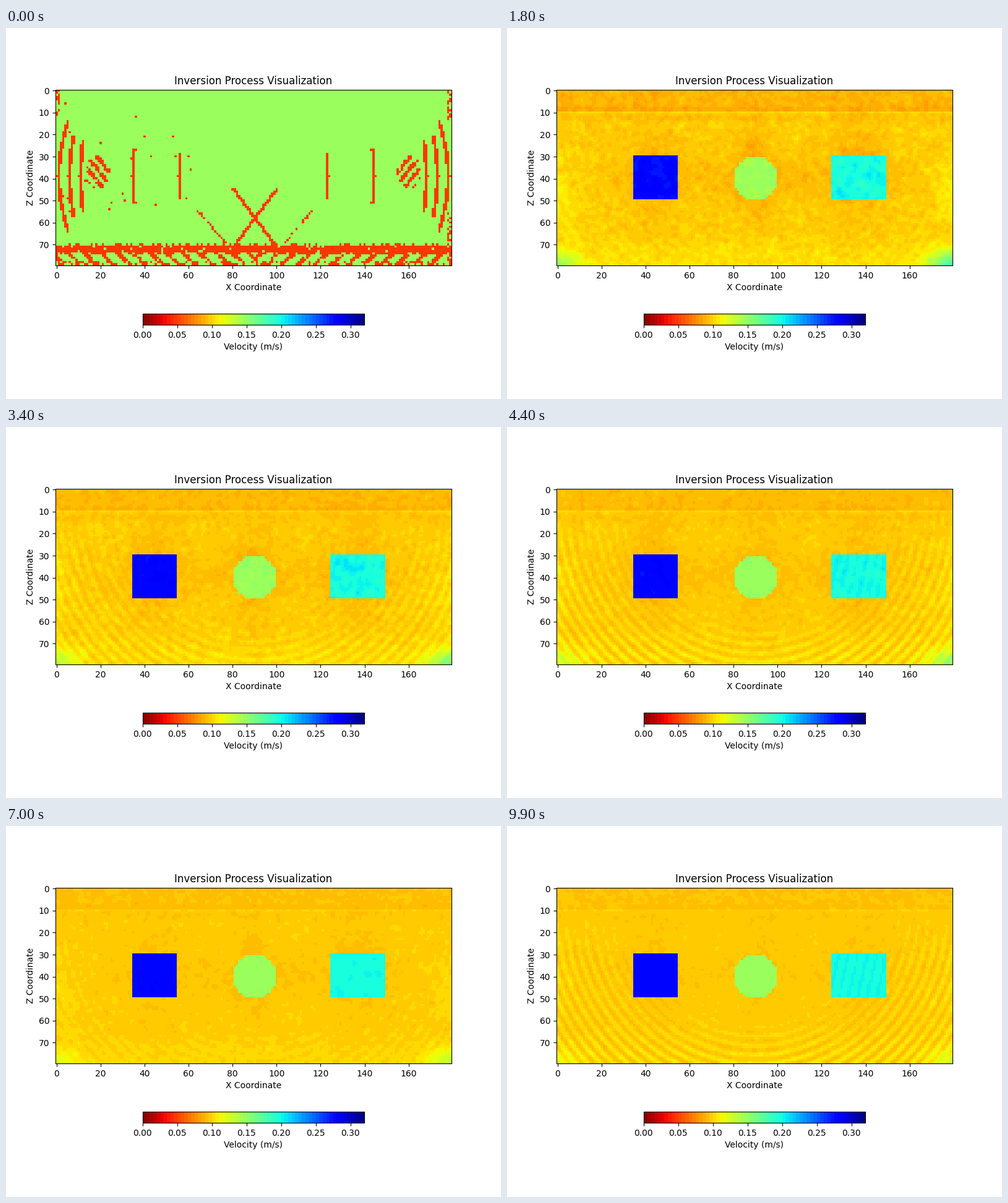
Recreate the animation shown at these times as a matplotlib script. Size 800 px wide and 600 px high, loop 10000 ms.

```python
import numpy as np
import matplotlib.pyplot as plt
from matplotlib.animation import FuncAnimation
from matplotlib.colors import ListedColormap

FRAMES, STEP = 100, 100
NZ, NX = 80, 180
rng = np.random.default_rng(11)
z, x = np.mgrid[0:NZ, 0:NX].astype(float)
dx = x - 90.3
wall = np.minimum(x, 179 - x)  # distance to the nearer side


def bump(v, center, width):
    return np.exp(-((v - center) / width) ** 2)


def smooth_noise(passes):
    f = rng.standard_normal((NZ, NX))
    for _ in range(passes):
        for axis in (0, 1):
            f = (np.roll(f, 1, axis) + 2 * f + np.roll(f, -1, axis)) / 4
    return f / f.std()


def box(x0, x1, z0, z1):
    return (x >= x0) & (x <= x1) & (z >= z0) & (z <= z1)


square = box(35, 54, 30, 49)
disc = (x - 90) ** 2 + (z - 40) ** 2 < 100
slab = box(125, 149, 30, 49)


def first_update():
    """Sign of the first step: wavefronts at both sides, rays, a lower band."""
    dice = rng.random((NZ, NX))

    # Bowed wavefronts, mirrored left and right
    bow = wall - 5 * ((z - 39) / 24) ** 2 * np.exp(-wall / 20)
    red = np.zeros((NZ, NX), bool)
    for start, reach in ((0, 25), (5, 18), (10, 16), (34, 12), (55, 10)):
        red |= (bow >= start) & (bow < start + 1.8) & (np.abs(z - 39) <= reach)

    # Hatched clumps
    inside = ((wall - 19) / 6) ** 2 + ((z - 37) / 8) ** 2 < 1
    red |= inside & (np.sin(1.4 * (.8 * z - wall)) > -.1) & (dice < .85)

    # Crossing rays and the fainter pair outside them
    ray = np.abs(dx) - .75 * np.abs(z - 58)
    red |= (np.abs(ray) < .8) & (z > 44) & (z < 72)
    outer = np.abs(dx) - 24 + .85 * (z - 57)
    red |= (np.abs(outer) < .6) & (z > 54) & (z < 72) & (dice < .75)

    # Loose specks, mostly on the left
    red |= (x < 65) & (z > 4) & (z < 56) & (dice < .008)
    ragged = (wall < 2) & ((z < 14) | ((z > 55) & (x > 90)))
    red |= ragged & (dice < .5)

    # Lower band with hatching under it
    red |= (z > 70) & (z < 74) & (dice < .95)
    red |= (z == 70) & (dice < .35)
    red |= (z == 74) & (dice < np.where(x > 100, .8, .4))
    red |= (z > 73) & (np.sin(.84 * (np.abs(dx) + 1.1 * z)) > .45) & (dice < .85)
    red |= (z > 77) & (dice < .3)
    return np.where(red, .0499, .1499)


first = first_update()
grain_a, grain_b = smooth_noise(1), smooth_noise(1)
patch_a, patch_b = smooth_noise(2), smooth_noise(2)

# Shadows above and below each body, a surface band and a middle belt
shade = -.008 * (z < 10) - .004 * bump(z, 8.5, .8) + .004 * (z == 10)
shade -= .004 * bump(z, 12.5, 2)
for center, width in ((44, 10), (90, 8), (137, 12)):
    shade -= .009 * bump(x, center, width) * bump(z, 37, 23)
shade -= .006 * bump(z, 39, 9) * bump(x, 90, 75)
shade += .006 * np.clip((z - 62) / 14, 0, 1)

glow = .014 * np.exp(-wall / 8) * bump(z, 45, 17)
glow += np.where(x < 90, .045, .08) * bump(wall, 0, 10) * bump(z, 79, 6)

radius = np.hypot(dx, z - 10)
reach = np.clip((radius - 42) / 45, 0, 1) * np.clip((z - 8) / 25, 0, 1)
reach += .5 * np.clip((z - 62) / 12, 0, 1)


def velocity(k):
    turn = .12 * k
    grain = np.cos(turn) * grain_a + np.sin(turn) * grain_b
    patch = np.cos(turn) * patch_a + np.sin(turn) * patch_b
    fade = np.exp(-k / 45)
    wave = .55 + .35 * np.cos(2 * np.pi * (k - 45) / 50)

    v = .0982 + (.25 + 1.2 * fade) * shade + (.15 + 1.1 * fade) * glow
    v += .0024 * (.3 + 1.2 * fade) * grain
    v += .0065 * reach * wave * np.sin(2 * np.pi * radius / 4.2 - .15 * k)

    rough = 1.5 * fade * patch
    stripe = np.sin(2 * np.pi * (x + .22 * z) / 4.3)
    v = np.where(square, .2785 + .0028 * rough, v)
    v = np.where(disc, .1472 + .003 * rough, v)
    v = np.where(slab, .1985 + .004 * rough + .003 * wave * stripe, v)
    w = np.exp(-k / 3)
    return w * first + (1 - w) * v


colors = ListedColormap(plt.get_cmap("jet_r")(np.arange(2, 256, 4)))
fig = plt.figure(figsize=(8, 6), dpi=100)
ax = fig.add_axes([.1, .36, .8, .8 * 800 * NZ / NX / 600])
image = ax.imshow(first, cmap=colors, vmin=0, vmax=.32,
                  interpolation="nearest", aspect="auto")
ax.set_title("Inversion Process Visualization")
ax.set_xlabel("X Coordinate")
ax.set_ylabel("Z Coordinate")
ax.set_xticks(range(0, NX, 20))
ax.set_yticks(range(0, NZ, 10))
cax = fig.add_axes([.276, .2, .448, .03])
bar = fig.colorbar(image, cax=cax, orientation="horizontal")
bar.set_label("Velocity (m/s)")


def draw(k):
    image.set_data(velocity(k))
    return [image]


anim = FuncAnimation(fig, draw, frames=FRAMES, interval=STEP,
                     repeat=True, repeat_delay=0, blit=False)
plt.show()
```
